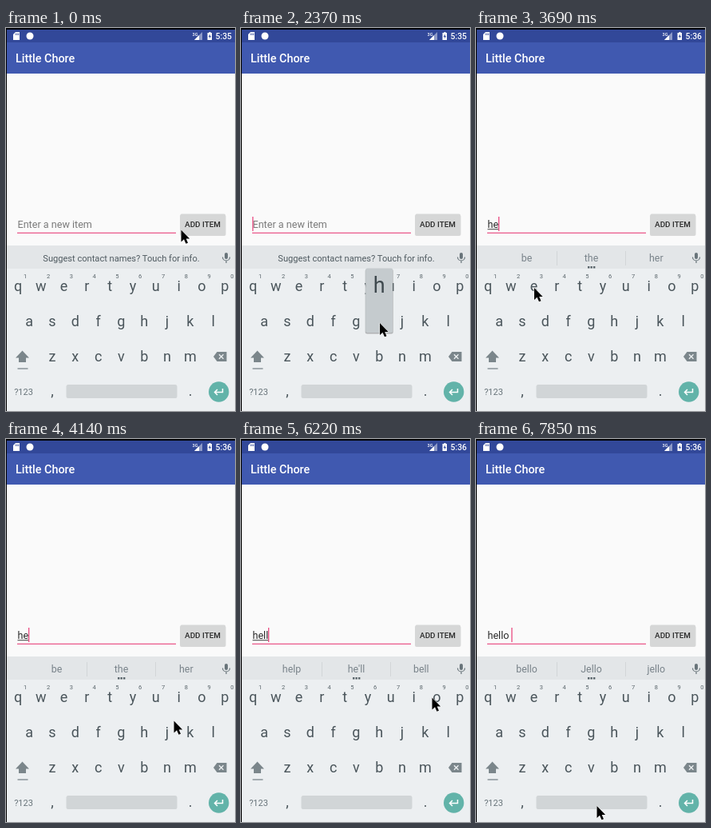
An HTML page for the animation above (8 s loop, 287x479 px).

```html
<!DOCTYPE html>
<html lang="en">
<head>
<meta charset="utf-8">
<style>
  html, body { margin: 0; width: 100%; height: 100%; overflow: hidden; background: #fafafa; }
  svg { display: block; width: 287px; height: 479px; font-family: Roboto, "Liberation Sans", sans-serif; }
  text { white-space: pre; }
  .mid { text-anchor: middle; }
  .key { font-size: 18px; fill: #4a555b; text-anchor: middle; }
  .digit { font-size: 7.5px; fill: #59646a; text-anchor: middle; }
  .word { font-size: 12.4px; fill: #79838a; text-anchor: middle; }
  .entry { font-size: 12.6px; }
</style>
</head>
<body>
<svg viewBox="0 0 287 479">
  <rect width="287" height="479" fill="#fafafa"/>
  <!-- status bar -->
  <rect width="287" height="19" fill="#324899"/>
  <rect y="18" width="287" height="39" fill="#4059b0"/>
  <path d="M12 5H17V15H9V8Z" fill="#fff"/>
  <path d="M12.2 6.5V9M14 6.5V9M15.7 6.5V9" stroke="#324899" stroke-width=".8"/>
  <circle cx="30" cy="10" r="4.5" fill="#fff"/>
  <path d="M246 5V15H236Z" fill="#fff" opacity=".45"/>
  <path d="M242 9V15H236Z" fill="#fff"/>
  <text x="233.5" y="9.5" font-size="5.5" font-weight="500" fill="#fff">3G</text>
  <path d="M253.5 6H254.5V5H256.5V6H258V15H252.500V6Z" fill="#fff"/>
  <path d="M255.8 7.5L253.8 11H255.2V13.500L257 10H255.800Z" fill="#324899"/>
  <text id="clock" x="283" y="14" font-size="10.4" font-weight="500" fill="#fff" text-anchor="end"></text>
  <text x="12" y="43" font-size="14.4" font-weight="500" fill="#fff">Little Chore</text>

  <!-- entry row -->
  <text id="hint" class="entry" x="14.5" y="250" fill="#7a7a7a">Enter a new item</text>
  <text id="typed" class="entry" x="14.5" y="250" fill="#2b2b2b"></text>
  <rect id="compose" x="14.5" y="251.2" height="1" fill="#444"/>
  <rect x="14" y="255.700" width="199" height="1.3" fill="#ea5c8d"/>
  <rect id="caret" y="236" width="1.3" height="18" fill="#ea4c82"/>
  <rect x="218" y="233.500" width="57.500" height="26.500" rx="2" fill="#000" opacity=".14"/>
  <rect x="218.500" y="232.500" width="56.500" height="26" rx="1.5" fill="#d6d7d7"/>
  <text class="mid" x="246.500" y="249" font-size="9.9" font-weight="500" fill="#2a2a2a">ADD ITEM</text>

  <!-- keyboard -->
  <rect y="272" width="287" height="207" fill="#eceff1"/>
  <rect y="272" width="287" height="29" fill="#e3e6e8"/>
  <text id="notice" class="mid" x="144.500" y="292" font-size="11.1" fill="#4f5a60">Suggest contact names? Touch for info.</text>
  <g id="strip">
    <path d="M101.500 279V297M187.500 279V297" stroke="#d2d6d8"/>
    <text class="word" x="63.500" y="292"></text>
    <text class="word" x="144.500" y="292"></text>
    <text class="word" x="225.800" y="292"></text>
    <path d="M140 298h2.400v2.400h-2.400zM143.500 298h2.400v2.400h-2.400zM147 298h2.400v2.400h-2.400z" fill="#59646a"/>
  </g>
  <rect x="274" y="281" width="4" height="8" rx="2" fill="#68747a"/>
  <path d="M271.500 286.500A4.500 4.500 0 0 0 280.500 286.500M276 291V294" fill="none" stroke="#68747a" stroke-width="1.2"/>
  <g id="keys"></g>
  <path d="M20.500 403.500L29 412.500H25V418H16V412.500H12Z" fill="#7b868b"/>
  <path d="M14.500 426H27.500" stroke="#7b868b" stroke-width="1.3"/>
  <path d="M260 411L264.500 405H276.500V417H264.500Z" fill="#7b868b"/>
  <path d="M267 408.300L272.500 413.700M272.500 408.300L267 413.700" stroke="#eceff1" stroke-width="1.4"/>
  <text class="mid" x="22" y="459" font-size="11" fill="#68747a">?123</text>
  <text class="key" x="58" y="460">,</text>
  <rect x="75.500" y="446" width="139" height="17" rx="2.500" fill="#d1d5d7"/>
  <text class="key" x="231" y="460">.</text>
  <circle cx="266.700" cy="455" r="12.700" fill="#62b3a9"/>
  <path d="M271.500 451V455.500H262M265 452L261.500 455.500L265 459" fill="none" stroke="#fff" stroke-width="1.500"/>

  <g id="popup">
    <rect x="-17.500" y="1" width="35" height="81" rx="2.500" fill="#000" opacity=".25"/>
    <rect x="-17" width="34" height="80.500" rx="2" fill="#c5cbce"/>
    <text class="mid" y="30" font-size="27" fill="#3f494e"></text>
  </g>
  <path d="M0 0H287V2H1V479H0Z" fill="#000"/>
  <path id="pointer" d="M0 0V15L3.500 11.800L6 17.300L8.500 16.200L6.200 11H10.700Z" fill="#000" stroke="#fff" stroke-width="1" paint-order="stroke"/>
</svg>
<script>
const LOOP = 8000, TICKS = 54, TICK = LOOP / TICKS;
const $ = id => document.getElementById(id);

const rows = [
  { letters: 'qwertyuiop', x: 15, y: 329 },
  { letters: 'asdfghjkl', x: 29.2, y: 373 },
  { letters: 'zxcvbnm', x: 58, y: 417 }
];
const PITCH = 28.8;
const keyAt = {};

function addText(cls, x, y, str) {
  const el = document.createElementNS('http://www.w3.org/2000/svg', 'text');
  el.setAttribute('class', cls);
  el.setAttribute('x', x);
  el.setAttribute('y', y);
  el.textContent = str;
  $('keys').append(el);
}

rows.forEach((row, r) => [...row.letters].forEach((ch, i) => {
  const x = row.x + i * PITCH;
  keyAt[ch] = { x, y: row.y };
  addText('key', x, row.y, ch);
  if (r === 0) addText('digit', x + 9.200, 313, (i + 1) % 10);
}));

// All times below are in ticks.
const entries = [
  { at: 0, text: '', end: 14.5, words: [] },
  { at: 17, text: 'h', end: 21.5, words: ['he', 'his', 'had'] },
  { at: 25, text: 'he', end: 28.3, words: ['be', 'the', 'her'] },
  { at: 37, text: 'hel', end: 31.3, words: ['held', 'help', 'hello'] },
  { at: 40, text: 'hell', end: 34.3, words: ['help', "he'll", 'bell'] },
  { at: 45, text: 'hello', end: 41.3, words: ['bello', 'Jello', 'jello'] },
  { at: 53, text: 'hello ', end: 44.6, words: ['bello', 'Jello', 'jello'], done: true }
];
const presses = { 16: 'h', 24: 'e', 36: 'l', 39: 'l', 44: 'o' };
const caretOn = [[1, 4], [8, 11], [14, 20], [23, 30], [33, 44], [45, 49], [53, 54]];
const path = [
  [0, 219.5, 252.5], [6, 170, 361], [8, 169.5, 362.5], [11, 169.5, 362.5],
  [14, 174, 369], [16, 174, 369], [20, 103.5, 338.5], [23, 73, 325], [25, 73, 325],
  [28, 210.500, 352.500], [29, 210.5, 352.5], [34, 252.5, 365.5], [40, 252.5, 365.5],
  [42, 239.5, 323.5], [44, 240, 324], [47, 152, 458], [50, 151.500, 459], [54, 151.5, 459]
];

function pointerAt(tick) {
  const n = path.findIndex(p => p[0] > tick);
  const [t0, x0, y0] = path[n - 1], [t1, x1, y1] = path[n];
  const k = (tick - t0) / (t1 - t0);
  return [x0 + (x1 - x0) * k, y0 + (y1 - y0) * k];
}

const show = (el, on) => el.setAttribute('visibility', on ? 'visible' : 'hidden');
const place = (el, x, y) => el.setAttribute('transform', `translate(${x} ${y})`);
const words = document.querySelectorAll('.word');

function render(ms) {
  const tick = Math.min(TICKS - 1, Math.floor((ms + 14) / TICK));
  const entry = entries.filter(e => e.at <= tick).pop();
  const empty = !entry.text;

  $('clock').textContent = tick < 22 ? '5:35' : '5:36';
  $('typed').textContent = entry.text;
  show($('hint'), empty);
  show($('notice'), empty);
  show($('strip'), !empty);
  words.forEach((el, i) => el.textContent = entry.words[i] || '');

  show($('compose'), !empty && !entry.done);
  $('compose').setAttribute('width', entry.end - 14.5);
  $('caret').setAttribute('x', entry.end - .3);
  show($('caret'), caretOn.some(([from, to]) => tick >= from && tick < to));

  const pressed = presses[tick];
  show($('popup'), pressed);
  if (pressed) {
    place($('popup'), keyAt[pressed].x, keyAt[pressed].y - 72.5);
    $('popup').lastElementChild.textContent = pressed;
  }
  place($('pointer'), ...pointerAt(tick));
}

const start = performance.now();
function loop() {
  render((performance.now() - start) % LOOP);
  requestAnimationFrame(loop);
}
loop();
</script>
</body>
</html>
```
